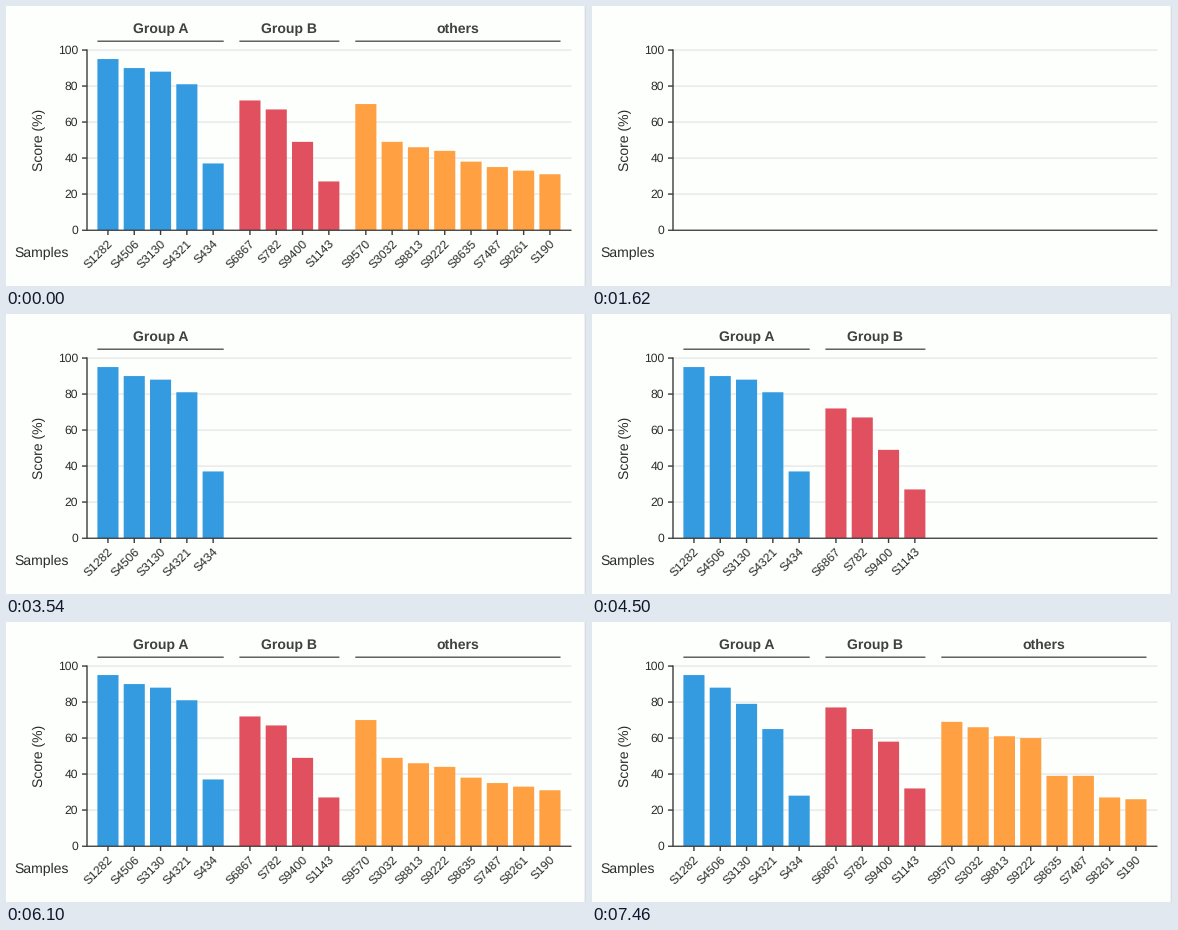
Recreate the animation shown at these times as a matplotlib script. Size 580 px wide and 280 px high, loop 8 s.

```python
import matplotlib.pyplot as plt
from matplotlib.animation import FuncAnimation
from matplotlib.patches import Rectangle

plt.rcParams["text.hinting"] = "none"

W, H, DPI = 580, 280, 100
LOOP, STEP, PHASE = 8000, 80, 20
PX = 72 / DPI
BASE, UNIT = 224.05, 1.8         # y of zero, pixels per percent
LEFT, RIGHT = 81, 565.5
BAR, PITCH = 21.1, 26.3
DARK, INK, HEAD = "#3a3a3a", "#2b2b2b", "#404040"

# title, colour, left edge, fade start, samples, first / middle / last scores
GROUPS = [
    ("Group A", "#359be1", 91.4, 2340, "S1282 S4506 S3130 S4321 S434",
     [95, 90, 88, 81, 37], [95, 89, 83.5, 73, 32.5], [95, 88, 79, 65, 28]),
    ("Group B", "#e0505f", 233.4, 3780, "S6867 S782 S9400 S1143",
     [72, 67, 49, 27], [74.5, 66, 53.5, 29.5], [77, 65, 58, 32]),
    ("others", "#ffa042", 349.3, 5300,
     "S9570 S3032 S8813 S9222 S8635 S7487 S8261 S190",
     [70, 49, 46, 44, 38, 35, 33, 31],
     [69.5, 57.5, 53.5, 52, 38.5, 37, 30, 28.5],
     [69, 66, 61, 60, 39, 39, 27, 26]),
]

fig = plt.figure(figsize=(W / DPI, H / DPI), dpi=DPI, facecolor="#fdfffc")
ax = fig.add_axes([0, 0, 1, 1])
ax.set(xlim=(0, W), ylim=(H, 0))
ax.axis("off")


def line(x, y, color, width, z=3):
    return ax.plot(x, y, color=color, lw=width * PX, zorder=z, snap=False,
                   solid_capstyle="butt")[0]


def text(x, y, s, size, color=INK, **kw):
    return ax.text(x, y, s, fontsize=size * PX, color=color, va="baseline",
                   family="Liberation Sans", rotation_mode="anchor", **kw)


def build_axes():
    parts = [line([LEFT] * 2, [43.4, BASE + 0.6], DARK, 1.4),
             line([76, RIGHT], [BASE + 0.2] * 2, DARK, 1.3),
             text(8.4, 250.6, "Samples", 14),
             text(37, 134, "Score (%)", 14, rotation=90, ha="center")]
    for v in range(0, 101, 20):
        y = BASE - UNIT * v
        parts.append(text(72, y + 4, str(v), 12.1, ha="right"))
        if v:
            parts.append(line([76, LEFT], [y] * 2, DARK, 1.4))
            parts.append(line([LEFT, RIGHT], [y] * 2, "#dedfe0", 1, z=1))
    return parts


def build_group(title, color, left, names):
    right = left + PITCH * (len(names) - 1) + BAR
    parts = [line([left, right], [35.2] * 2, "#484848", 1.3),
             text((left + right) / 2, 27, title, 14, HEAD,
                  weight="bold", ha="center")]
    bars = []
    for i, name in enumerate(names):
        x = left + i * PITCH
        mid = x + BAR / 2
        bars.append(ax.add_patch(Rectangle((x, BASE), BAR, 0, fc=color,
                                           lw=0, zorder=2, snap=False)))
        parts.append(line([mid] * 2, [BASE, 229], DARK, 1.4))
        parts.append(text(mid + 5.7, 238.2, name, 12.1, rotation=45,
                          ha="right"))
    return parts + bars, bars


def fade(t, start, length, first):
    if t < start:
        return 0
    return min(1, first + (1 - first) * (t - start) / length)


def ease(t, start, length=400):
    p = min(1, max(0, (t - start) / length))
    return p * p * (3 - 2 * p)


def set_alpha(parts, a):
    for part in parts:
        part.set_alpha(a)
        part.set_visible(a > 0)


edge = line([579.3] * 2, [0, H], "#dcdae4", 1.4)
frame_parts = build_axes()
groups = [build_group(g[0], g[1], g[2], g[4].split()) for g in GROUPS]


def draw(i):
    t = i * STEP + PHASE
    opening = t < 80             # the finished chart flashes up first
    set_alpha(frame_parts, 1 if opening else fade(t, 980, 320, 0.12))
    p, q = ease(t, 6100), ease(t, 7060)
    for (parts, bars), g in zip(groups, GROUPS):
        set_alpha(parts, 1 if opening else fade(t, g[3], 400, 0.06))
        for bar, a, b, c in zip(bars, *g[5:]):
            score = a + (b - a) * p + (c - b) * q
            bar.set_height(-UNIT * score)
    return []


anim = FuncAnimation(fig, draw, frames=LOOP // STEP, interval=STEP,
                     repeat=True, repeat_delay=0, init_func=lambda: draw(0))
plt.show()
```
